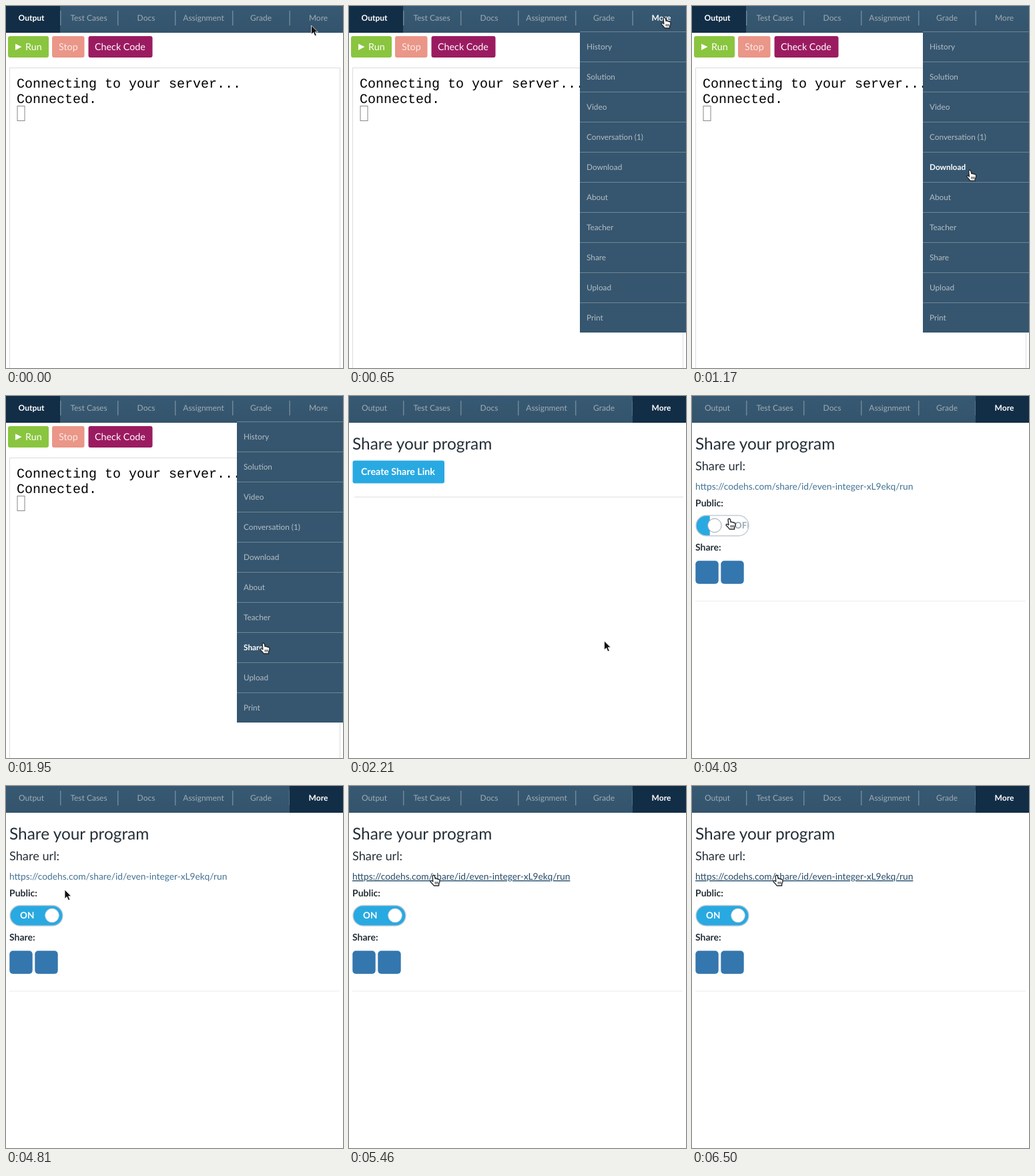
An HTML page that plays this animation: 505x541 px, repeating every 7.02 s.

```html
<!DOCTYPE html>
<html lang="en">
<head>
<meta charset="utf-8">
<title>Share your program</title>
<style>
  html, body { margin: 0; width: 100%; height: 100%; overflow: hidden; background: #fff; }
  svg { display: block; width: 505px; height: 541px; }
  text { font-family: Lato, sans-serif; text-rendering: geometricPrecision; }
  .tab { font-size: 12px; text-anchor: middle; fill: #a0abb3; }
  .item { font-size: 11.8px; fill: #b3bdc4; }
  .lit { fill: #fff; font-weight: bold; }
  .button { font-size: 14.3px; fill: #fff; }
  .mono { font: 20px "Liberation Mono", monospace; white-space: pre; }
  .bold { font-weight: bold; }
  #share text { fill: #252f37; }
  #share .white { fill: #fff; }
  #share #link { font-size: 13.77px; fill: #447394; }
  #share #link.hover { fill: #244b69; text-decoration: underline; }
  #knob { fill: #fff; stroke: #96a2ad; }
  #knob.on { stroke: #cfdbe2; }
</style>
</head>
<body>
<svg viewBox="0 0 505 541">
  <defs>
    <linearGradient id="bar" x2="0" y2="1">
      <stop stop-color="#375973"/><stop offset="1" stop-color="#34546c"/>
    </linearGradient>
    <clipPath id="pill"><rect x="6" y="178.5" width="79" height="30.5" rx="15.25"/></clipPath>
  </defs>

  <g id="output">
    <rect x="3" y="45" width="61" height="32" rx="3" fill="#8ac53f"/>
    <path d="M14 56.5L23.5 61L14 66Z" fill="#fff"/>
    <text class="button" x="29" y="66">Run</text>
    <rect x="69" y="45" width="48.5" height="32" rx="3" fill="#ea9688"/>
    <text class="button" x="79" y="66" opacity=".8">Stop</text>
    <rect x="123.5" y="45" width="96" height="32" rx="3" fill="#9b1b61"/>
    <text class="button" x="133" y="66">Check Code</text>
    <rect x="5.5" y="92.5" width="495" height="470" fill="none" stroke="#ddd"/>
    <text class="mono" x="16" y="121.5">Connecting to your server...</text>
    <text class="mono" x="16" y="144.5">Connected.</text>
    <rect x="17" y="149.5" width="11" height="22" fill="none" stroke="#888"/>
  </g>

  <g id="share">
    <text x="5" y="80.4" font-size="24.4">Share your program</text>
    <g id="create">
      <rect x="5.5" y="96.5" width="137.5" height="34" rx="3" fill="#29a9e1"/>
      <text class="white bold" x="18" y="118" font-size="14.2">Create Share Link</text>
      <path d="M8 151H501" stroke="#e8e8e8" stroke-width="1.5"/>
    </g>
    <g id="details">
      <text x="5" y="111" font-size="18.2">Share url:</text>
      <text id="link" x="5" y="140">https://codehs.com/share/id/even-integer-xL9ekq/run</text>
      <text class="bold" x="5" y="164.5" font-size="14">Public:</text>
      <g clip-path="url(#pill)">
        <g id="slider">
          <rect x="6" y="178" width="80" height="32" fill="#29a9e1"/>
          <text class="white bold" x="21" y="198" font-size="13.5">ON</text>
          <text class="bold" x="123" y="198" font-size="13.5" style="fill:#9ca8b4">OFF</text>
        </g>
      </g>
      <rect x="6" y="178.5" width="79" height="30.5" rx="15.25" fill="none" stroke="#c3ccd4" stroke-width="1.3"/>
      <circle id="knob" cy="193.5" r="10.3"/>
      <text class="bold" x="5" y="230.5" font-size="14">Share:</text>
      <rect x="5.3" y="246.3" width="34.4" height="34.4" rx="5" fill="#3476ae"/>
      <rect x="43.3" y="246.3" width="34.4" height="34.4" rx="5" fill="#3476ae"/>
      <path d="M5 306.5H500" stroke="#ececec"/>
    </g>
  </g>

  <rect width="505" height="40" fill="url(#bar)"/>
  <path d="M81.7 7V29M167.7 7V29M253.7 7V29M339.7 7V29M425.2 7V29" stroke="#70889a" stroke-width="1.5"/>
  <rect id="active" width="81" height="40" fill="#122e46"/>
  <g id="tabs"></g>
  <g id="menu"><rect x="346" y="38" width="159" height="450" fill="#36566f"/></g>

  <path id="arrow" d="M.5 0V13.5L3.7 10.6L5.900 15.800L8.300 14.800L6.100 9.800H10.300Z" fill="#111" stroke="#fff" stroke-width=".8"/>
  <g id="hand" fill="#fff" stroke="#23282c" stroke-linejoin="round">
    <path stroke-width="1.4" d="M2 4.5Q3.500 2 5.200 4.300L6.200 8.500Q7.600 7.600 8.600 8.900Q10 8.200 11 9.600Q12.800 9.200 13 11.200Q13.200 14 11.600 16.600V19H4.200Q3 17-.6 13.500Q-1.600 11.800 .2 11.400Q1.500 11.500 2.800 12.800Z"/>
    <path d="M6.200 13V16.500M8.200 13V16.500M10.200 13V16.500"/>
  </g>
</svg>
<script>
const LOOP = 7020, STEP = 130;
const MENU_OPEN = 650, SHARE_PAGE = 2210, LINK_MADE = 3120, TOGGLED = 4030, LINK_HOVER = 4940;
const $ = id => document.getElementById(id);

const tabNames = ['Output', 'Test Cases', 'Docs', 'Assignment', 'Grade', 'More'];
const itemNames = ['History', 'Solution', 'Video', 'Conversation (1)', 'Download',
  'About', 'Teacher', 'Share', 'Upload', 'Print'];

$('tabs').innerHTML = tabNames.map((name, i) =>
  `<text class="tab" x="${38 + 86 * i}" y="22">${name}</text>`).join('');
$('menu').innerHTML += itemNames.map((name, i) =>
  `<path d="M346 ${38.5 + 45 * i}H505" stroke="#6d8596"/>` +
  `<text class="item" x="356" y="${65 + 45 * i}">${name}</text>`).join('');
const tabs = document.querySelectorAll('.tab');
const items = document.querySelectorAll('.item');

// Pointer stops: time, x, y
const stops = [[0, 457, 29], [130, 457, 29], [390, 469, 14], [780, 469, 14], [1430, 382, 366],
  [2210, 382, 366], [2860, 106, 112], [3250, 106, 112], [3770, 52, 180], [4550, 52, 180],
  [5070, 123, 130], [LOOP, 123, 130]];
const handTimes = [[260, SHARE_PAGE], [2860, 3380], [3770, 4680], [LINK_HOVER, LOOP]];

const within = (t, [from, to]) => t >= from && t < to;
const show = (id, on) => $(id).style.display = on ? '' : 'none';
const smooth = p => p * p * (3 - 2 * p);

function pointerAt(t) {
  const i = stops.findIndex(stop => stop[0] > t);
  const [t0, x0, y0] = stops[i - 1], [t1, x1, y1] = stops[i];
  const p = smooth((t - t0) / (t1 - t0));
  return [x0 + (x1 - x0) * p, y0 + (y1 - y0) * p];
}

function draw(now) {
  const t = Math.floor(now % LOOP / STEP) * STEP;
  const [x, y] = pointerAt(t);
  const sharing = t >= SHARE_PAGE, made = t >= LINK_MADE;

  show('output', !sharing);
  show('share', sharing);
  show('create', !made);
  show('details', made);
  show('menu', within(t, [MENU_OPEN, SHARE_PAGE]));

  const active = sharing ? 5 : 0;
  $('active').setAttribute('x', sharing ? 425 : 0);
  tabs.forEach((tab, i) =>
    tab.classList.toggle('lit', i === active || i === 5 && within(t, [260, 910])));
  const hovered = Math.floor((y + 3 - 39) / 45);
  items.forEach((item, i) => item.classList.toggle('lit', i === hovered));

  const on = smooth(Math.max(0, Math.min(1, (t - TOGGLED + STEP) / 390)));
  $('slider').setAttribute('transform', `translate(${80 * (on - 1)})`);
  $('knob').setAttribute('cx', 21.5 + 47.5 * on);
  $('knob').classList.toggle('on', on === 1);
  $('link').classList.toggle('hover', t >= LINK_HOVER);

  const hand = handTimes.some(span => within(t, span));
  show('hand', hand);
  show('arrow', !hand);
  $(hand ? 'hand' : 'arrow').setAttribute('transform', `translate(${x} ${y})`);
}

function tick(now) {
  draw(now);
  requestAnimationFrame(tick);
}
draw(0);
requestAnimationFrame(tick);
</script>
</body>
</html>
```
